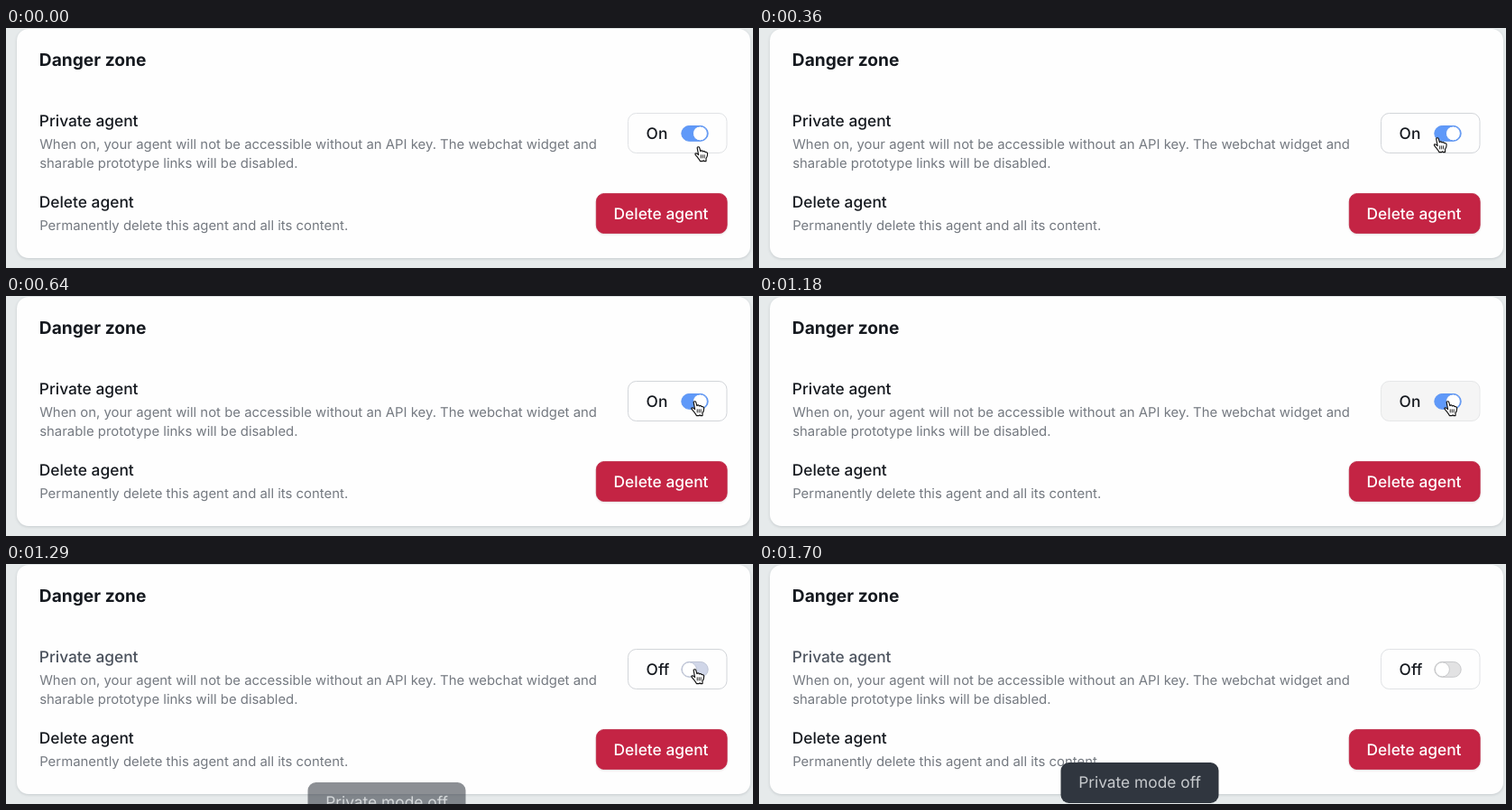
Recreate the animation shown at these times as an HTML page. Size 828 by 266 pixels, loop 2.93 s.

```html
<!DOCTYPE html>
<html lang="en">
<head>
<meta charset="utf-8">
<title>Danger zone</title>
<style>
  html, body { margin: 0; width: 100%; height: 100%; overflow: hidden; background: #e6eaeb; }
  svg { display: block; width: 828px; height: 266px; }
  text { font-family: Inter, "Noto Sans", sans-serif; text-rendering: geometricPrecision; white-space: pre; }
  .title { font-size: 19.2px; font-weight: 700; fill: #15191f; }
  .label { font-size: 17.35px; font-weight: 500; fill: #15191f; }
  .note { font-size: 14.9px; fill: #747980; }
  .card { filter: drop-shadow(0 1px 1.5px rgba(30, 45, 55, .16)); }
  .danger { filter: drop-shadow(0 1px 1px rgba(80, 20, 40, .15)); }
</style>
</head>
<body>
<svg viewBox="0 0 828 266">
  <rect width="828" height="266" fill="#e6eaeb"/>
  <rect class="card" x="12" y="1" width="813" height="254" rx="13" fill="#fefefe"/>

  <text class="title" x="36.8" y="42">Danger zone</text>
  <text class="label" id="heading" x="36.8" y="109">Private agent</text>
  <text class="note" x="37.2" y="134">When on, your agent will not be accessible without an API key. The webchat widget and</text>
  <text class="note" x="37.2" y="155">sharable prototype links will be disabled.</text>
  <text class="label" x="36.8" y="199">Delete agent</text>
  <text class="note" x="37.2" y="224">Permanently delete this agent and all its content.</text>

  <rect id="box" x="689.5" y="94.5" width="109.5" height="44" rx="9"/>
  <text class="label" id="state" x="709.6" y="123">On</text>
  <rect id="track" x="748.8" y="108.5" width="29.4" height="16.8" rx="8.4"/>
  <circle id="thumb" cy="116.9" r="8" fill="#fff"/>

  <rect class="danger" x="654.3" y="183.4" width="144.9" height="44.2" rx="9" fill="#c42444" stroke="#bc2241" stroke-width=".8"/>
  <text class="label" x="673.6" y="212" style="fill:#fff">Delete agent</text>

  <g id="toast">
    <rect x="334.5" y="220" width="175" height="45" rx="9" fill="#30363f"/>
    <text x="354.2" y="248" font-size="17.35" fill="#c8cbce">Private mode off</text>
  </g>

  <g id="hand" stroke="#111" stroke-linejoin="round" stroke-linecap="round">
    <path fill="#fff" stroke-width="1.15" d="M3.2 2.2C2.9.5 5.3.2 5.8 1.8L6.8 5.6C7.4 4.6 9.2 4.7 9.5 6C10.2 5.2 11.7 5.5 12 6.7C13 6.2 14.5 6.9 14.6 8.2C14.7 10.5 14.2 12 13 13.6V16.6H10.8L10.2 15.8L9.2 16.6H6.4C6 15 4.2 13.2 2.6 11.2C1.8 10.2.4 9 .9 8.2C1.7 7.3 3 8 4.6 9.6Z"/>
    <path fill="none" stroke-width=".9" d="M7.2 9.8V13M9.2 9.8V13M11.2 9.8V13"/>
  </g>
  <path id="arrow" fill="#111" stroke="#fff" d="M.5.5V14.5L3.8 11.4L6 16.4L8.3 15.4L6.2 10.6H10.6Z"/>
</svg>
<script>
const LOOP = 2930;
const $ = id => document.getElementById(id);
const set = (id, attrs) => {
  for (const k in attrs) $(id).setAttribute(k, attrs[k]);
};

// time, x, y, shape
const pointer = [
  [0, 763, 131, "hand"], [60, 757, 131, "hand"], [120, 750, 129, "hand"], [180, 747, 127.5, "hand"],
  [360, 747.5, 121, "hand"], [420, 750, 118.5, "hand"], [470, 753, 117, "hand"],
  [530, 756, 116.3, "hand"], [590, 758, 116, "hand"], [640, 759, 116, "hand"],
  [1520, 765, 116, "hand"], [1580, 783, 116, "hand"], [1640, 805, 116, "arrow"], [1700, 0, 0, ""]
];

// time, fill, border
const boxes = [
  [0, "#fefefe", "#e0e2e5"], [60, "#fefefe", "#d2d5d9"], [1180, "#f5f5f5", "#e6e7e8"],
  [1230, "#fefefe", "#d2d5d9"], [1640, "#fefefe", "#e0e2e5"]
];

// time, track, border, thumb x, heading colour
const toggles = [
  [0, "#5f99f9", "#5f96f2", 769.4, "#15191f"],
  [1230, "#8fb2f2", "#8ba9e2", 763, "#2c323b"],
  [1290, "#d0d6e8", "#bfc5d6", 757.4, "#4a515c"],
  [1350, "#e2e2e3", "#c8c9cb", 757.4, "#4f5661"]
];

// time, offset, opacity
const toasts = [[0, 48, 0], [1230, 42, .1], [1290, 22, .55], [1350, 0, 1]];

const at = (steps, t) => steps.findLast(s => s[0] <= t);

function draw(t) {
  const [, x, y, shape] = at(pointer, t);
  for (const id of ["hand", "arrow"]) {
    set(id, { transform: `translate(${x} ${y})`, visibility: id === shape ? "visible" : "hidden" });
  }

  const [, fill, stroke] = at(boxes, t);
  set("box", { fill, stroke });

  const [, track, edge, cx, ink] = at(toggles, t);
  set("track", { fill: track, stroke: edge });
  set("thumb", { cx, stroke: edge });
  $("heading").style.fill = ink;
  $("state").textContent = t < 1230 ? "On" : "Off";

  const [, dy, opacity] = at(toasts, t);
  set("toast", { transform: `translate(0 ${dy})`, opacity });
}

const start = performance.now();
function tick() {
  draw((performance.now() - start) % LOOP);
  requestAnimationFrame(tick);
}
draw(0);
requestAnimationFrame(tick);
</script>
</body>
</html>
```
